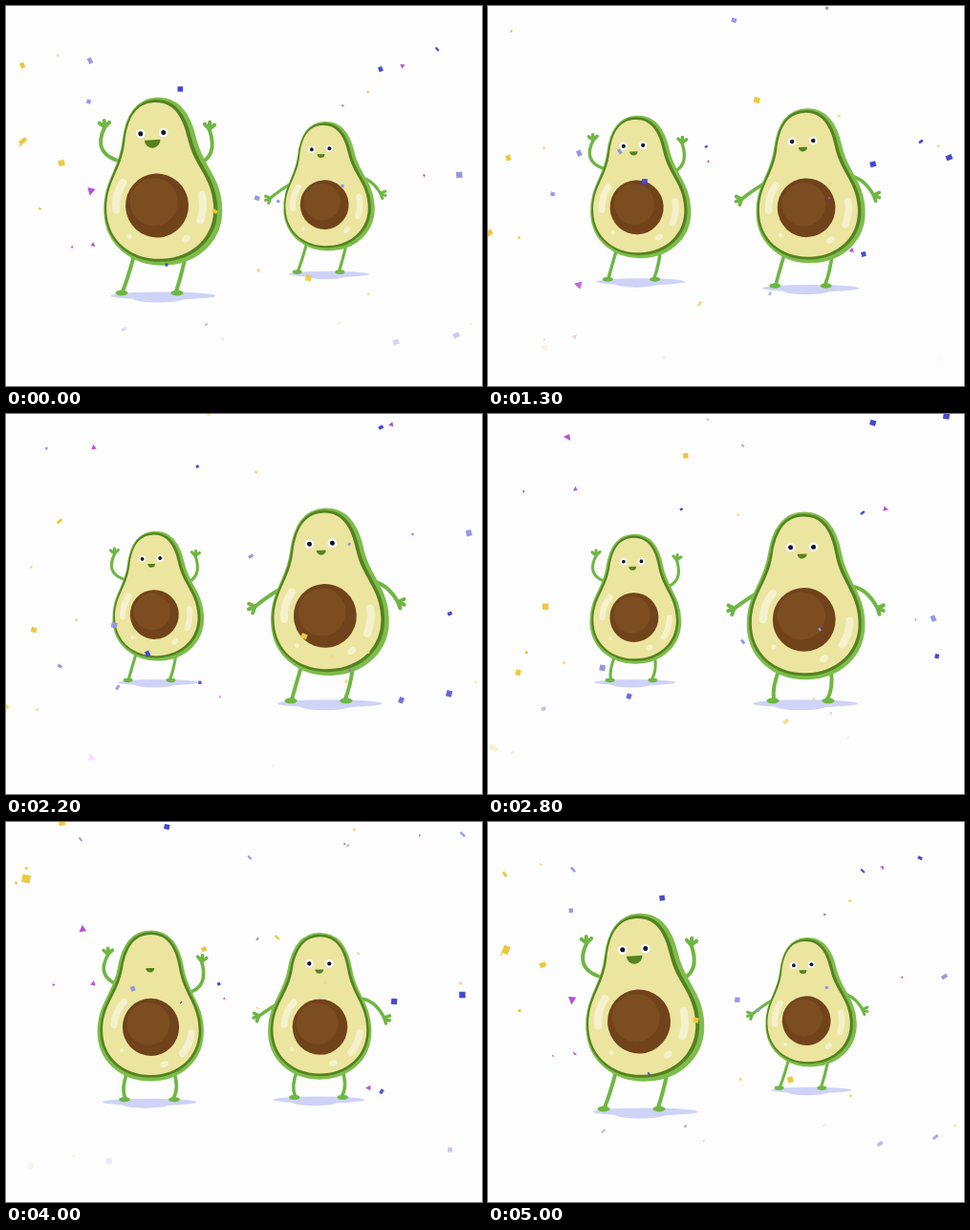
An HTML page with a canvas that plays this animation: 498 px wide and 398 px high, repeating every 5100 ms.

```html
<!DOCTYPE html>
<html lang="en">
<head>
<meta charset="utf-8">
<title>Dancing avocados</title>
<style>
  html, body { margin: 0; width: 100%; height: 100%; overflow: hidden; background: #fdfdfd; }
  canvas { display: block; }
</style>
</head>
<body>
<canvas id="stage" width="498" height="398"></canvas>
<script>
const ctx = document.getElementById('stage').getContext('2d');
const LOOP = 5100, STEP = 100, CYCLE = 5000, TAU = Math.PI * 2;
const RIM = '#7cbd4b', LIMB = '#6fb644', DARK = '#55821f', FLESH = '#ebe59f', SHINE = '#f5f1cd';
const rad = deg => deg * Math.PI / 180;

// Side-to-side weight shift: [time, lean], eased between extremes
const SWAY = [[0, 1], [740, -1], [1200, .9], [1800, -1], [2300, 1], [2500, 1]];
function swayAt(time) {
  const t = time % 2500;
  const i = SWAY.findIndex(key => key[0] > t);
  const [t0, a] = SWAY[i - 1], [t1, b] = SWAY[i];
  return a + (b - a) * (1 - Math.cos(Math.PI * (t - t0) / (t1 - t0))) / 2;
}

function ellipse(x, y, rx, ry, fill, turn = 0) {
  ctx.fillStyle = fill;
  ctx.beginPath();
  ctx.ellipse(x, y, rx, ry, turn, 0, TAU);
  ctx.fill();
}

function curve(x0, y0, cx, cy, x1, y1) {
  ctx.beginPath();
  ctx.moveTo(x0, y0);
  ctx.quadraticCurveTo(cx, cy, x1, y1);
  ctx.stroke();
}

function hand(x, y, angle) {
  ctx.beginPath();
  for (const spread of [-48, 0, 48]) {
    const a = rad(angle + spread);
    ctx.moveTo(x, y);
    ctx.lineTo(x + 7 * Math.cos(a), y + 7 * Math.sin(a));
  }
  ctx.stroke();
}

const pear = new Path2D(
  'M0-108C20-108 29-92 33-68C38-38 56-27 56 4C56 35 32 56 0 56' +
  'C-32 56-56 35-56 4C-56-27-38-38-33-68C-29-92-20-108 0-108Z');

function skin(x, y, color, border) {
  ctx.save();
  ctx.translate(x, y);
  ctx.fillStyle = ctx.strokeStyle = color;
  ctx.lineWidth = border;
  ctx.fill(pear);
  if (border) ctx.stroke(pear);
  ctx.restore();
}

function streak(radius, center, half) {
  ctx.beginPath();
  ctx.arc(0, 0, radius, rad(center - half), rad(center + half));
  ctx.stroke();
}

function arms(raised) {
  ctx.strokeStyle = LIMB;
  ctx.lineWidth = 4;
  if (raised) {
    curve(-40, -50, -64, -60, -50, -85);
    hand(-50, -85, -92);
    curve(42, -40, 68, -46, 59, -77);
    hand(59, -77, -82);
  } else {
    curve(-46, -30, -58, -24, -73, -13);
    hand(-73, -13, 160);
    curve(44, -34, 64, -36, 77, -11);
    hand(77, -11, 25);
  }
}

function face(smile, blink) {
  if (!blink) for (const side of [-1, 1]) {
    ellipse(-1 + side * 12, -76, 4.8, 4.8, '#fff');
    ellipse(-1 + side * 12, -76, 2.5, 2.5, '#15152c');
  }
  ctx.fillStyle = DARK;
  ctx.beginPath();
  ctx.ellipse(-1, -69, 5 + 3.3 * smile, 5 + 3.5 * smile, 0, 0, Math.PI);
  ctx.fill();
}

function avocado(x, ground, size, sway, raised, smile, blink) {
  const pitX = 2 + 6 * sway, pitY = -85 - 7 * sway * sway, tilt = rad(-3.2 * sway);
  ctx.save();
  ctx.translate(x, ground);
  ctx.scale(size, size);
  ctx.lineCap = ctx.lineJoin = 'round';

  const shade = 1 + 13.5 * sway;
  ellipse(shade, 2.5, 55, 4, '#ced3f7');
  ellipse(shade - 5, 5, 27, 4.5, '#ced3f7');

  ctx.strokeStyle = LIMB;
  ctx.lineWidth = 4;
  for (const side of [-1, 1]) {
    const hip = pitX + side * 27 - pitY * 0 + 3 * sway, ankle = side * 28;
    const bend = 1 - Math.abs(sway);
    const knee = (hip + ankle) / 2 + side * 7 * bend;
    curve(hip, pitY + 52, knee, (pitY + 58) / 2, ankle, -2);
    ellipse(ankle + side, -.5, 6.5, 3, LIMB);
  }

  ctx.translate(pitX, pitY);
  ctx.rotate(tilt);
  arms(raised);
  skin(6 * sway, 1, RIM, 12);
  skin(4 * sway, 0, DARK, 6);
  skin(3 * sway, 0, FLESH, 0);

  ctx.strokeStyle = SHINE;
  ctx.lineWidth = 8;
  const left = 203 - 6 * sway, right = 23 - 17 * sway;
  streak(43, left, 20);
  streak(48, right, 16);
  const spot = (radius, angle, rx, ry) => ellipse(
    radius * Math.cos(rad(angle)), radius * Math.sin(rad(angle)), rx, ry, SHINE, rad(angle + 90));
  spot(46, right + 46, 5, 3.5);
  spot(43, left - 62, 2.5, 2.5);

  ellipse(0, 0, 33, 33.5, '#71431a');
  ellipse(-3, -4, 25, 25, '#7b4d21');
  face(smile, blink);
  ctx.restore();
}

// Seeded confetti, each piece falling a whole number of times per loop
let seed = 41;
const random = () => (seed = seed * 16807 % 2147483647) / 2147483647;
const COLORS = ['#edc83f', '#4549d3', '#b94fd9', '#9698e6', '#efdc85'];
const pieces = Array.from({ length: 34 }, (_, i) => ({
  x: 10 + random() * 478, start: random(), falls: 1 + i % 2,
  size: 3 + random() ** 3 * 6, drift: random() * 40 - 20,
  spin: 1 + Math.floor(random() * 4), color: COLORS[i % 5], triangle: i % 5 === 2
}));

function confetti(time) {
  for (const p of pieces) {
    const k = (p.start + p.falls * time / LOOP) % 1;
    const turn = TAU * (p.start + p.spin * time / LOOP);
    const r = p.size / 2;
    ctx.save();
    ctx.globalAlpha = Math.min(1, (1 - k) * 4);
    ctx.translate(p.x + p.drift * Math.sin(TAU * k), -8 + 380 * k);
    ctx.rotate(turn);
    ctx.scale(1, .35 + .65 * Math.abs(Math.cos(turn * 2)));
    ctx.fillStyle = p.color;
    ctx.beginPath();
    ctx.moveTo(-r, r);
    ctx.lineTo(r, r);
    if (p.triangle) ctx.lineTo(0, -r);
    else { ctx.lineTo(r, -r); ctx.lineTo(-r, -r); }
    ctx.fill();
    ctx.restore();
  }
}

function draw(now) {
  const time = Math.floor(now % LOOP / STEP) * STEP;
  const swing = Math.cos(TAU * time / CYCLE);
  const near = ((1 + swing) / 2) ** 1.4;
  const sway = swayAt(time);
  const size = depth => .77 + .23 * depth;
  const ground = depth => 279 + 22 * depth;

  ctx.fillStyle = '#fdfdfd';
  ctx.fillRect(0, 0, 498, 398);
  const blink = time >= 3950 && time <= 4100;
  avocado(150, ground(near), size(near), sway, true, Math.max(0, swing) ** 6, blink);
  avocado(327, ground(1 - near), size(1 - near), sway, false, 0, false);
  confetti(time);
  requestAnimationFrame(draw);
}
requestAnimationFrame(draw);
</script>
</body>
</html>
```
